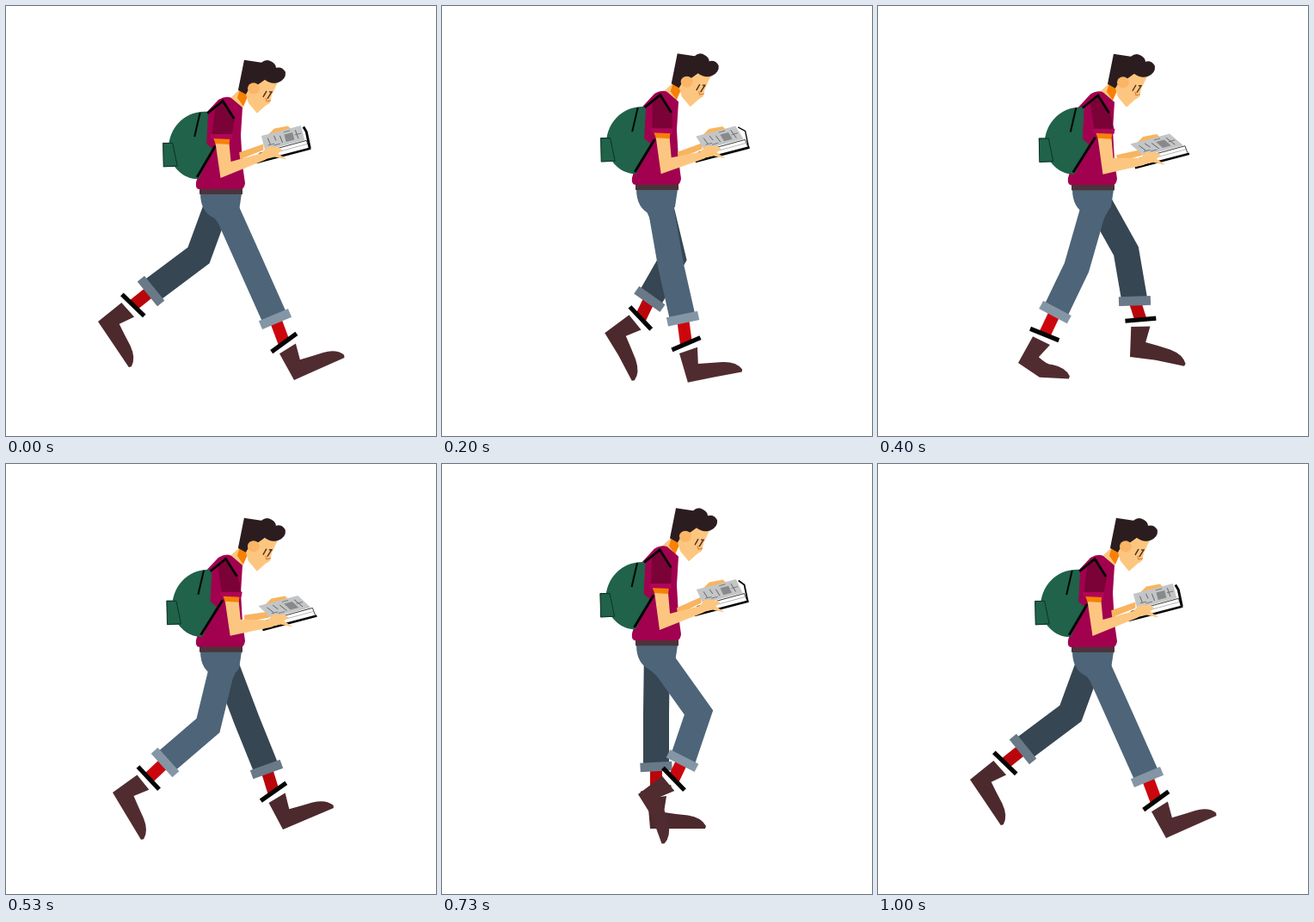
An HTML page with a canvas that plays this animation: 500 by 500 pixels, repeating every 1030 ms.

```html
<!DOCTYPE html>
<html lang="en">
<head>
<meta charset="utf-8">
<title>Walking reader</title>
<style>
html, body { margin: 0; width: 100%; height: 100%; overflow: hidden; background: #fff; }
canvas { display: block; width: 500px; height: 500px; }
</style>
</head>
<body>
<canvas id="stage" width="500" height="500"></canvas>
<script>
const ctx = document.getElementById('stage').getContext('2d');
const LOOP = 1030, STEPS = 24, RAD = Math.PI / 180;

// Start time of each drawing; the walk is animated in 24 even steps.
const STARTS = [0, 70, 100, 130, 170, 210, 250, 290, 330, 370, 410, 450, 490,
  530, 570, 600, 640, 690, 730, 770, 820, 870, 900, 950, 1000];

// step, knee x y, ankle x y, cuff angle, heel x y, foot angle, toe bend
const GAIT = [
  [0, 284, 299, 313, 364, -23, 335, 435, -24, 0],
  [1, 283, 309, 306, 366, -20, 325, 436, -23, 0],
  [3, 273, 304, 292, 364, -15, 303, 438, -16, 0],
  [6, 252, 301, 252, 363, -3, 245, 435, 0, 0],
  [8, 240, 299, 219.5, 361, 17, 190, 425, 20, 18],
  [9, 231, 304, 206, 356, 28, 163, 415, 34, 31],
  [12, 227, 301, 171.5, 342.5, 51, 110, 378, 56, 0],
  [13, 235, 304, 185, 347, 48, 124, 382, 59, 0],
  [15, 257, 310, 225, 354, 39, 173, 394, 57, 0],
  [18, 298.5, 289, 279.5, 345, 27, 228, 384, 58, -12],
  [20, 297, 289, 296, 347, 10, 269, 404, 28, -8],
  [21, 291.5, 296, 301.5, 354, -2, 296, 419, 7, -5]
];

const NEAR = { pants: '#4e6478', cuff: '#8496a5', sock: '#cb070d', boot: '#502c30' };
const FAR = { pants: '#364652', cuff: '#697988', sock: '#b8060c', boot: '#4c292d' };
const SKIN = '#fdc680', ORANGE = '#f68104', HAIR = '#2b1d1f', SHIRT = '#a1014f',
  SLEEVE = '#7a0236', GREEN = '#20624a', BLACK = '#050505';

function gaitKey(i) {
  const n = GAIT.length, wrap = Math.floor(i / n);
  const row = GAIT[i - wrap * n];
  return { at: row[0] + wrap * STEPS, v: row.slice(1) };
}

// Periodic cubic through the gait keys.
function gait(step) {
  const s = ((step % STEPS) + STEPS) % STEPS;
  let i = GAIT.length - 1;
  while (GAIT[i][0] > s) i--;
  const [a, b, c, d] = [i - 1, i, i + 1, i + 2].map(gaitKey);
  const h = c.at - b.at, u = (s - b.at) / h, u2 = u * u, u3 = u2 * u;
  return b.v.map((p, j) => {
    const q = c.v[j];
    const m0 = (q - a.v[j]) / (c.at - a.at) * h;
    const m1 = (d.v[j] - p) / (d.at - b.at) * h;
    return (2 * u3 - 3 * u2 + 1) * p + (u3 - 2 * u2 + u) * m0 +
      (3 * u2 - 2 * u3) * q + (u3 - u2) * m1;
  });
}

function trace(pts) {
  ctx.beginPath();
  for (let i = 0; i < pts.length; i += 2) ctx.lineTo(pts[i], pts[i + 1]);
}

function poly(color, pts) {
  trace(pts);
  ctx.closePath();
  ctx.fillStyle = color;
  ctx.fill();
}

function line(color, width, pts) {
  trace(pts);
  ctx.strokeStyle = color;
  ctx.lineWidth = width;
  ctx.stroke();
}

function shape(color, d) {
  ctx.fillStyle = color;
  ctx.fill(new Path2D(d));
}

function placed(x, y, angle, draw) {
  ctx.save();
  ctx.translate(x, y);
  ctx.rotate(angle * RAD);
  draw();
  ctx.restore();
}

function boot(color, bend) {
  const c = Math.cos(bend * RAD), s = Math.sin(bend * RAD);
  const toe = (x, y) => [30 + (x - 30) * c + y * s, y * c - (x - 30) * s];
  ctx.beginPath();
  ctx.moveTo(0, 0);
  ctx.lineTo(-3, -35);
  ctx.lineTo(19, -38);
  ctx.lineTo(16, -19);
  ctx.quadraticCurveTo(30, -17, ...toe(44, -15.5));
  ctx.quadraticCurveTo(...toe(60, -13), ...toe(65, -3));
  ctx.lineTo(...toe(64, 0));
  ctx.lineTo(30, 0);
  ctx.closePath();
  ctx.fillStyle = color;
  ctx.fill();
}

function leg(step, col, bob, dx, dy) {
  const [kx, ky, ax, ay, cuff, hx, hy, foot, bend] = gait(step);
  const hipY = 230 + 0.4 * bob;
  ctx.save();
  ctx.translate(dx, dy);
  const c = Math.cos(foot * RAD), s = Math.sin(foot * RAD);
  line(col.sock, 14, [ax, ay, hx + 7 * c + 44.5 * s, hy + 7 * s - 44.5 * c]);
  placed(hx, hy, foot, () => {
    boot(col.boot, bend);
    placed(7, -44.5, -12, () => {
      ctx.fillStyle = BLACK;
      ctx.fillRect(-18, -2.6, 36, 5.2);
    });
  });
  line(col.pants, 30, [253, hipY, kx, ky, ax, ay]);
  if (col === NEAR) poly(col.pants, [237, hipY + 10, 270, hipY + 7, kx, ky]);
  placed(ax, ay, cuff, () => {
    ctx.fillStyle = col.cuff;
    ctx.fillRect(-18.5, -5.3, 37, 10.6);
  });
  ctx.restore();
}

function body(bob, sway) {
  ctx.save();
  ctx.transform(1, 0, 0, 1 - 0.00223 * bob, 0, 1.138 * bob);
  shape(NEAR.pants, 'M226 218H274L271 238Q264 250 243 247Q226 240 226 218Z');
  ctx.fillStyle = '#493439';
  ctx.fillRect(225, 212, 50, 7);
  shape(SHIRT, 'M232 125L247 109Q256 104 262 107L275 118L273 150L275 185L278 206Q277 213 273 213H224Q220 212 221 205L231 170Z');
  ctx.restore();

  ctx.save();
  ctx.translate(sway, 0.75 * bob);
  shape(GREEN, 'M235 123C207 121 189 143 189 165C190 188 207 202 224 201L240 166L233 160Z');
  shape(GREEN, 'M182 159H194L199 187H183Z');
  line('#0d3325', 1, [183, 187, 182.5, 159.5, 193.5, 159.5, 199, 186, 183, 187]);
  line(BLACK, 2, [225.5, 124, 219, 152]);
  line(BLACK, 3, [222, 199, 243 + sway, 163 - sway]);
  ctx.restore();
}

function head(bob) {
  ctx.save();
  ctx.translate(0.42 * bob, bob);
  poly(SKIN, [260, 108, 272, 97, 282, 104, 273, 123, 264, 116]);
  poly(ORANGE, [272, 97, 282, 103, 276, 117, 269, 107]);
  shape(SKIN, 'M283 92L302 84L316 89L309 104L307 113L302 116L292 125L282 113L279 103Z');
  shape(HAIR, 'M277 63L297 66Q303 61 309 65Q314 68 314 72Q321 70 325 77Q326 85 317 89Q309 92 301 86L294 91L283 96L279 103L270 98Z');
  ctx.beginPath();
  ctx.ellipse(288, 96, 7, 6.5, 0, 0, 7);
  ctx.fillStyle = '#fbb567';
  ctx.fill();
  line('#4a2c22', 1.4, [299, 106, 303, 99]);
  line('#4a2c22', 1.4, [304, 108, 309, 100, 306, 100]);
  line('#d98530', 1.2, [302, 107, 303, 111, 308, 110]);
  ctx.restore();
}

function armsAndBook(bob, sway) {
  const bx = 1.65 * sway, by = 0.8 * bob + 2.6 * sway;
  const gx = -0.8 * sway, gy = 0.8 * bob + 3.3 * sway;
  const ex = 2.6 * sway, ey = 0.6 * bob, sy = 0.85 * bob;

  // far arm and hand
  poly('#f8b45f', [271 + ex / 2, 170 + by / 2, 299 + bx, 160 + by, 299 + bx, 167 + by, 272 + ex / 2, 178 + by / 2]);
  poly('#f9b45a', [303 + gx, 151 + gy, 312 + gx, 142 + gy, 328 + gx, 139 + gy, 331 + gx, 142 + gy, 322 + gx, 152 + gy]);

  // book block and cover
  ctx.save();
  ctx.translate(bx, by);
  poly('#fff', [293, 170, 348, 155, 352, 164, 292, 180]);
  line('#3c3c3c', 1, [294, 180, 294, 171, 349, 156, 352, 164]);
  line('#a5a5a5', 0.8, [295, 175, 350, 160]);
  line(BLACK, 2.6, [291, 181.5, 354, 165]);
  ctx.restore();
  const edge = 3 - 0.75 * sway;
  if (edge > 0.2) line(BLACK, edge, [346 + gx, 140 + gy, 349 + bx, 146 + by, 353 + bx, 165 + by]);

  // raised page with marks
  const page = (u, v) => [
    297 + 46 * u + 4 * v + gx + (bx - gx) * v,
    150.5 - 12 * u + 17 * v + gy + (by - gy) * v
  ];
  const quad = (color, u0, v0, u1, v1) =>
    poly(color, [...page(u0, v0), ...page(u1, v0), ...page(u1, v1), ...page(u0, v1)]);
  quad('#c4c5c6', 0, 0, 1, 1);
  quad('#88898b', 0.55, 0.3, 0.76, 0.8);
  for (const [u, v, w] of [[0.14, 0.25, 0.45], [0.3, 0.2, 0.35], [0.44, 0.3, 0.5], [0.84, 0.2, 0.6]])
    line('#626365', 1, [...page(u, v), ...page(u + 0.02, v + w)]);
  for (const [u, v] of [[0.1, 0.72], [0.24, 0.82], [0.55, 0.14], [0.8, 0.5]])
    line('#77787a', 1, [...page(u, v), ...page(u + 0.16, v)]);

  // near arm
  poly(SKIN, [243 + ex, 159 + sy, 259 + ex, 160 + sy, 261 + ex, 181 + ey,
    299 + bx, 170 + by, 302 + bx, 178 + by, 249 + ex, 200 + ey]);
  ctx.save();
  ctx.translate(bx, by);
  shape(SKIN, 'M296 171L304 163L317 164L321 167L316 171L326 178L312 175L299 178Z');
  ctx.restore();

  // sleeve
  poly(ORANGE, [240 + ex, 152 + sy, 260 + ex, 153 + sy, 259 + ex, 161 + sy, 243 + ex, 160 + sy]);
  const shx = 0.8 * sway, shy = 0.9 * bob;
  poly(SLEEVE, [243 + shx, 120 + shy, 253 + shx, 111 + shy, 266 + shx, 130 + shy,
    262 + ex, 150 + sy, 239 + ex, 149 + sy]);
  poly('#b00656', [237 + ex, 149 + sy, 263 + ex, 149 + sy, 262 + ex, 155 + sy, 238 + ex, 154 + sy]);
  line(BLACK, 2.8, [234 + shx, 125 + shy, 252 + shx, 110.5 + shy, 265 + shx, 131 + shy]);
}

function draw(step) {
  const turn = 2 * Math.PI / STEPS;
  const bob = 6 * Math.cos(2 * turn * (step - 0.4)) - 6;
  const sway = 2.5 - 2.5 * Math.cos(turn * (step + 1.5));
  ctx.fillStyle = '#fff';
  ctx.fillRect(0, 0, 500, 500);
  leg(step + STEPS / 2, FAR, bob, -3, -11);
  leg(step, NEAR, bob, 0, 0);
  head(bob);
  body(bob, sway);
  armsAndBook(bob, sway);
}

function tick() {
  const t = performance.now() % LOOP;
  let i = STARTS.length - 1;
  while (STARTS[i] > t) i--;
  draw(i % STEPS);
  requestAnimationFrame(tick);
}
tick();
</script>
</body>
</html>
```
